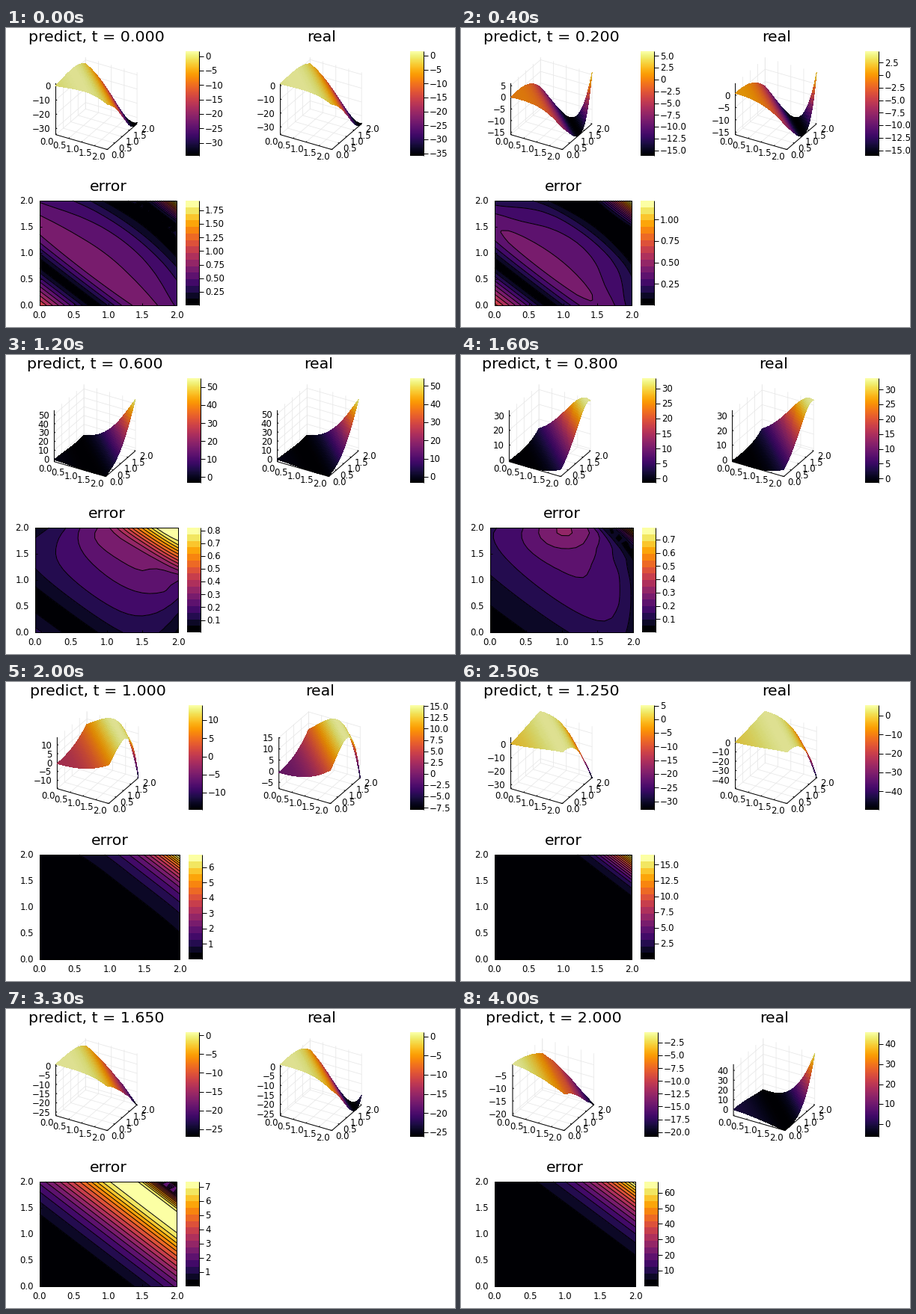
A matplotlib script for the animation above (4.1 s loop, 600x400 px).

```python
import numpy as np
import matplotlib
import matplotlib.pyplot as plt
from matplotlib.animation import FuncAnimation
from matplotlib.collections import LineCollection, PolyCollection
from matplotlib.patches import Rectangle

matplotlib.rcParams["font.family"] = "DejaVu Sans"

PX = 0.72                      # points per pixel at 100 dpi
TICK, TITLE = 11.8 * PX, 20.5 * PX
N = 41
BANDS = 16
SHADE = .88                    # surface light
CMAP = matplotlib.colormaps["inferno"]

grid = np.linspace(0, 2, N)
X, Y = np.meshgrid(grid, grid)
S = X + Y

# Deviation of the prediction along s = x + y, at a few times
S_KEYS = np.array([0, .4, .8, 1.4, 2, 2.6, 3.1, 3.5, 3.8, 4])
T_KEYS = np.array([0, .4, .8, 1, 1.25, 1.45, 1.65, 1.85, 2])
DEVIATION = np.array([
    [-1.1, -.55, 0, .66, .59, .42, .08, -.03, .95, 1.93],
    [-.38, -.2, 0, .185, .17, .14, .01, .2, .46, .53],
    [.02, .042, .074, .135, .188, .197, .165, .08, -.22, -.73],
    [0, .03, .05, .05, -.1, -.45, -1.25, -2.65, -4.7, -6.8],
    [0, 0, 0, -.2, -.4, -.4, .5, 3.7, 10.4, 16.6],
    [-.1, -.1, -.1, 0, .4, 2, 6, 12.9, 18, 20.3],
    [-.1, -.3, -.2, .5, 2, 4.7, 7.1, 6.4, .9, -6],
    [-.2, -.1, .05, .8, 2, 1.9, -3.6, -15.3, -30.6, -45],
    [-.3, 0, .1, .4, -.1, -4.2, -15.5, -32.8, -51.4, -67],
])


def hermite(xk, vk, x):
    """Cubic interpolation along the first axis of vk."""
    m = np.gradient(vk, xk, axis=0)
    i = np.clip(np.searchsorted(xk, x, "right") - 1, 0, len(xk) - 2)
    h = xk[i + 1] - xk[i]
    u = (x - xk[i]) / h
    return ((1 + 2 * u) * (1 - u) ** 2 * vk[i] + u * (1 - u) ** 2 * h * m[i]
            + u * u * (3 - 2 * u) * vk[i + 1] + u * u * (u - 1) * h * m[i + 1])


def bump(v, width):
    return np.exp(-(v / width) ** 2)


def real_field(t):
    return np.exp(S) * np.cos(S + 4 * t)


def deviation(t):
    d = hermite(S_KEYS, hermite(T_KEYS, DEVIATION, t), S)
    d = d - .03 * np.exp(-1.2 * t) * ((X - Y) * S / 2) ** 2
    x, y = X / 2, Y / 2
    d -= .2 * bump(t - .4, .2) * (y ** 6 * (1 - x) ** 2 + x ** 6 * (1 - y) ** 2)
    hump = .16 * bump(X - 1.1, .55) * bump(Y - 2.05, .45)
    return d + bump(t - .8, .2) * (hump - .07 * x ** 10)


def ticks(lo, hi, most):
    """Tick values with the smallest round step that is not too dense."""
    for k in range(-4, 4):
        for base in (1, 2.5, 5):
            step = base * 10.0 ** k
            if (hi - lo) / step < most:
                digits = max(0, -k + (base == 2.5))
                n = np.arange(np.ceil(lo / step), np.floor(hi / step + 1e-9) + 1)
                return n * step, digits


def label(v, digits):
    if abs(v) < 1e-9:
        return "0"
    return f"{v:.{digits}f}".replace("-", "\u2212")


def label_width(s):
    em = {"\u2212": .838, ".": .318}
    return 11.8 * sum(em.get(c, .636) for c in s)


def z_ticks(lim):
    values, digits = ticks(*lim, 6.5)
    return [(v, label(v, digits)) for v in values]


def lines(segments, color="black", width=1.0, z=2):
    ax.add_collection(LineCollection(segments, colors=color,
                                     linewidths=width * PX, zorder=z))


def text(x, y, s, ha="center", va="center_baseline", size=TICK):
    ax.text(x, y, s, ha=ha, va=va, fontsize=size, color="black", zorder=9)


def colorbar(x, top, lim, bands=None):
    lo, hi = lim
    if bands:
        h = 140 / bands
        for k in range(bands):
            ax.add_patch(Rectangle((x, top + 140 - (k + 1) * h), 18, h, lw=0,
                                   color=CMAP(k / (bands - 1))))
    else:
        ax.imshow(np.linspace(1, 0, 140)[:, None], cmap=CMAP, vmin=0, vmax=1,
                  extent=(x, x + 18, top + 140, top), aspect="auto",
                  interpolation="nearest")
    values, digits = ticks(lo, hi, 9.95)
    segments = [[(x + 18, top), (x + 18, top + 140)]]
    for v in values:
        if bands and abs(v) < 1e-9:
            continue
        y = top + 140 * (hi - v) / (hi - lo)
        segments.append([(x + 18, y), (x + 24, y)])
        text(x + 26, y - .7, label(v, digits), ha="left")
    lines(segments)


def surface(left, width, field, title, z_marks):
    lo, hi = field.min(), field.max()
    cx = left + width / 2
    x0, y0, k = cx - 54.5, 142.7, 79.5

    def project(x, y, z):
        """x and y in 0..2, z in 0..1, seen from azimuth 30 and elevation 30."""
        return (x0 + k * (.866 * x / 2 + .5 * y / 2),
                y0 + k * (.25 * x / 2 - .433 * y / 2 - .866 * z))

    def path(*points):
        return [project(*p) for p in points]

    heights = [(v - lo) / (hi - lo) for v, _ in z_marks]
    mesh = []
    for a in np.arange(0, 2.1, .5):
        mesh.append(path((a, 0, 0), (a, 2, 0), (a, 2, 1)))
        mesh.append(path((2, a, 0), (0, a, 0), (0, a, 1)))
    mesh += [path((0, 0, h), (0, 2, h), (2, 2, h)) for h in heights]
    lines(mesh, "#e8e8e8", .8, 1)

    axes = [path((0, 0, 1), (0, 0, 0), (2, 0, 0), (2, 2, 0))]
    for a in np.arange(0, 2.1, .5):
        axes.append(path((a, 0, 0), (a, .06, 0)))
        axes.append(path((2, a, 0), (1.95, a, 0)))
        px, py = project(a, 0, 0)
        text(px - 12, py + 8, f"{a:.1f}")
        px, py = project(2, a, 0)
        text(px + 14, py + 6, f"{a:.1f}")
    for h, (_, s) in zip(heights, z_marks):
        axes.append(path((0, 0, h), (.05, 0, h)))
        px, py = project(0, 0, h)
        text(px - 7, py, s, ha="right")
    lines(axes)

    z = (field - lo) / (hi - lo)
    pts = np.dstack(project(X, Y, z))
    quads = np.stack([pts[:-1, :-1], pts[:-1, 1:], pts[1:, 1:], pts[1:, :-1]], 2)
    level = (z[:-1, :-1] + z[:-1, 1:] + z[1:, 1:] + z[1:, :-1]) / 4
    colors = CMAP(level)
    colors[..., :3] *= SHADE
    # back rows first
    ax.add_collection(PolyCollection(
        quads[::-1].reshape(-1, 4, 2), facecolors=colors[::-1].reshape(-1, 4),
        edgecolors="none", antialiased=False, zorder=3))

    text(cx, 18, title, va="baseline", size=TITLE)
    colorbar(left + width + 12, 31, (lo, hi))


def error_map(left, right, err):
    top, bottom = 231, 371
    lo, hi = err.min(), err.max()
    levels = np.linspace(lo, hi, BANDS + 1)
    px = left + (right - left) * grid[::2] / 2
    py = bottom - (bottom - top) * grid[::2] / 2
    e = err[::2, ::2]
    ax.contourf(px, py, e, levels=levels, zorder=1,
                colors=[CMAP(k / (BANDS - 1)) for k in range(BANDS)])
    ax.contour(px, py, e, levels=levels[1:-1], colors="black",
               linewidths=PX, zorder=2)
    marks = [[(left, top), (right, top), (right, bottom), (left, bottom),
              (left, top)]]
    for a in np.arange(0, 2.1, .5):
        x = left + (right - left) * a / 2
        y = bottom - (bottom - top) * a / 2
        marks += [[(x, bottom), (x, bottom - 3)], [(left, y), (left + 3, y)]]
        text(x, 383, f"{a:.1f}")
        text(left - 8, y - .7, f"{a:.1f}", ha="right")
    lines(marks, z=4)
    text((left + right) / 2, 218, "error", va="baseline", size=TITLE)
    colorbar(right + 12, top, (lo, hi), BANDS)


def draw(i):
    t = i * .05
    real = real_field(t)
    dev = deviation(t)
    pred = real + dev

    ax.clear()
    ax.axis("off")

    # label widths push the panels, both columns share one plot width
    marks = [z_ticks((f.min(), f.max())) for f in (pred, real)]
    wide = [max(label_width(s) for _, s in m) for m in marks]
    left = max(wide[0], 18.8) - 10.8
    gap = 61.3 + wide[1]
    width = (528 - left - gap) / 2

    surface(left, width, pred, f"predict, t = {t:.3f}", marks[0])
    surface(528 - width, width, real, "real", marks[1])
    error_map(round(left + 31), round(left + width), np.abs(dev))

    ax.set_xlim(0, 600)
    ax.set_ylim(400, 0)
    return []


fig = plt.figure(figsize=(6, 4), dpi=100, facecolor="white")
ax = fig.add_axes([0, 0, 1, 1])
anim = FuncAnimation(fig, draw, frames=41, interval=100, init_func=lambda: [],
                     repeat=True, repeat_delay=0, blit=False)
plt.show()
```
